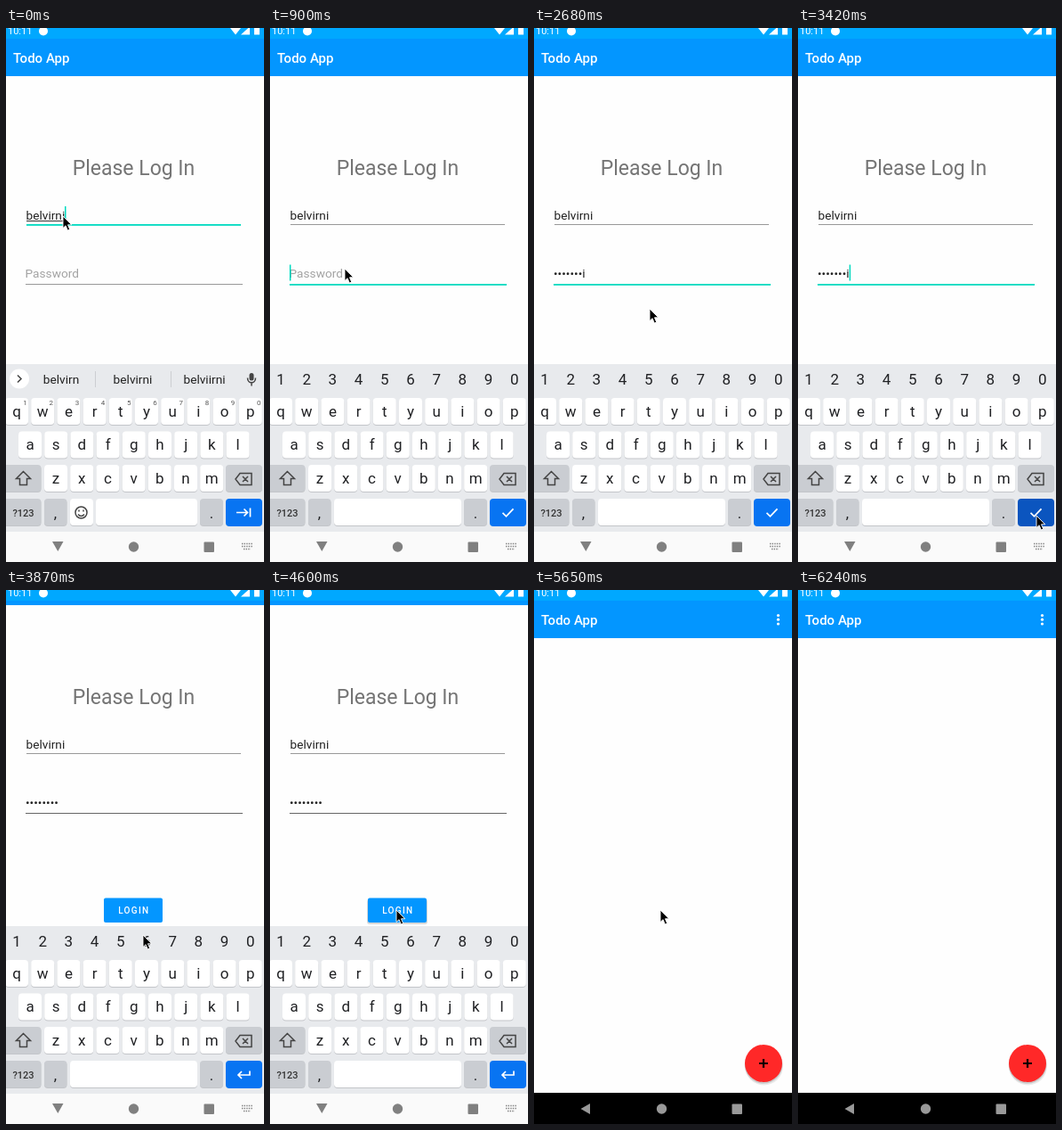
Animation of 290x599 px, one loop 6980 ms. Source, as an HTML page:

```html
<!DOCTYPE html>
<html lang="en">
<head>
<meta charset="utf-8">
<title>Todo App login</title>
<style>
html, body { margin: 0; height: 100%; overflow: hidden; background: #fff; }
svg { display: block; width: 100%; height: 100%; font-family: Roboto, "Open Sans", sans-serif; }
.mid { text-anchor: middle; }
.title { font-size: 15px; font-weight: 500; fill: #fff; }
.field { font-size: 13.7px; fill: #222; }
.key { font-size: 17px; fill: #202124; text-anchor: middle; }
.digit { font-size: 8px; fill: #555; text-anchor: middle; }
.line { fill: none; stroke: #444; stroke-width: 1.5; }
.white { fill: none; stroke: #fff; stroke-width: 1.7; }
</style>
</head>
<body>
<svg viewBox="0 0 290 599">
  <rect width="290" height="599" fill="#fefefe"/>

  <g id="login">
    <rect y="12" width="290" height="42" fill="#0396ff"/>
    <text class="title" x="8" y="39">Todo App</text>
    <text class="mid" x="143.5" y="165" font-size="23" fill="#757575">Please Log In</text>
    <text class="field" id="user" x="22.5" y="214.5"></text>
    <path id="composing" d="M23 216.5H65" stroke="#333"/>
    <rect id="userLine" x="23" y="220" width="241"/>
    <text class="field" id="hint" x="21.5" y="280" style="fill:#a3a3a3">Password</text>
    <text class="field" id="pass" x="22" y="279.7"></text>
    <rect id="passLine" x="22" y="287" width="244"/>
    <rect id="caret" width="1.5" fill="#00dac0"/>
    <rect id="shade" x="109" y="384" width="68" height="28" rx="3" fill="#000" opacity=".15"/>
    <rect x="110" y="382.5" width="66" height="27.5" rx="2" fill="#0396ff"/>
    <text class="mid" x="143.8" y="400" font-size="10" font-weight="500" letter-spacing="1.3" fill="#fff">LOGIN</text>
  </g>

  <g id="keyboard">
    <rect y="377" width="290" height="188" fill="#e8eaed"/>
    <g id="keys"></g>
    <path class="line" d="M19.5 497.5l-8 8h4v7h8v-7h4z"/>
    <path class="line" d="M258 506l5-6.5h13v13h-13zM266 503l6 6m0-6l-6 6"/>
    <text class="mid" x="19.5" y="548" font-size="11" font-weight="500" fill="#333">?123</text>
    <text class="key" x="55.5" y="550">,</text>
    <text class="key" x="231" y="550">.</text>
    <g id="suggest">
      <circle cx="15" cy="393.5" r="11" fill="#fff"/>
      <path class="line" d="M13 389.5l4 4-4 4"/>
      <path d="M100.5 385v18M185.5 385v18" stroke="#ccced2"/>
      <rect x="273.5" y="387" width="5" height="8.5" rx="2.5" fill="#444"/>
      <path class="line" d="M271.5 392.5c0 7 9 7 9 0M276 398v3.5" stroke-width="1.3"/>
    </g>
    <g id="smile">
      <circle class="line" cx="84.5" cy="543.5" r="6.5"/>
      <path class="line" d="M81 545.5q3.5 4 7 0M82 540.5v2M87 540.5v2"/>
    </g>
    <rect id="enter" x="247" y="528" width="41" height="31" rx="4"/>
    <path class="white" id="enterIcon"/>
  </g>

  <g id="home">
    <rect width="290" height="599" fill="#c9c9c9"/>
    <rect x="286" y="537" width="4" height="62"/>
    <rect width="290" height="18" fill="#00a8ff"/>
    <g id="homePage">
      <rect x="-9" y="12" width="299" height="552" fill="#fefefe"/>
      <rect x="-9" y="12" width="299" height="42" fill="#0396ff"/>
      <text class="title" x="8" y="39">Todo App</text>
      <g fill="#fff">
        <circle cx="274.5" cy="28.5" r="1.6"/><circle cx="274.5" cy="33.2" r="1.6"/><circle cx="274.5" cy="38" r="1.6"/>
      </g>
      <circle cx="258.5" cy="534" r="21.5" opacity=".08"/>
      <circle cx="258" cy="532.5" r="21.3" opacity=".14"/>
      <circle cx="258" cy="531" r="21" fill="#ff2828"/>
      <path d="M253 531h10M258 526v10" stroke="#000" stroke-width="2.2"/>
    </g>
  </g>

  <rect width="290" height="12" fill="#00a8ff"/>
  <g fill="#fff">
    <text x="2" y="7.3" font-size="11">10:11</text>
    <circle cx="42" cy="3.5" r="5"/>
    <path d="M252 0h12l-6 7.5zM264 7.5l10-9v9zM279 0h6v7.5h-6z"/>
  </g>

  <rect id="navBack" width="290" height="40"/>
  <g id="nav">
    <path id="back"/>
    <circle cx="143.5" cy="582" r="5.7"/>
    <rect x="222.5" y="576.5" width="11.5" height="11.5" rx="1"/>
    <path id="switcher" d="M265 578.5h12M265 581.5h12M267 584.5h8" fill="none" stroke-width="1.4" stroke-dasharray="1.4 1.2"/>
  </g>

  <path id="mouse" d="M0 0V13.5L3.1 10.7 5.3 16 7.7 15 5.5 9.8H9.8Z" fill="#000" stroke="#fff" stroke-width=".9"/>
</svg>

<script>
const LOOP = 6980, NAME = "belvirni", PITCH = 29.2;
const el = id => document.getElementById(id);
const set = (id, attrs) => { for (const k in attrs) el(id).setAttribute(k, attrs[k]); };
const show = (id, on) => set(id, { display: on ? "inline" : "none" });
const label = (x, y, s, cls) => `<text class="${cls}" x="${x}" y="${y}">${s}</text>`;
const key = (x, y, w, fill = "#fff") =>
  `<rect x="${x}" y="${y + 1}" width="${w}" height="30" rx="4" fill="#c3c5c9"/>` +
  `<rect x="${x}" y="${y}" width="${w}" height="30" rx="4" fill="${fill}"/>`;

function buildKeys() {
  const gray = "#cacdd2";
  let keys = "", digits = "", numbers = "";
  [["qwertyuiop", 12, 415], ["asdfghjkl", 27, 452.5], ["zxcvbnm", 56, 490]].forEach(([row, x0, y]) =>
    [...row].forEach((c, i) => {
      const x = x0 + i * PITCH;
      keys += key(x - 13, y, 26) + label(x, y + 20.5, c, "key");
    }));
  for (let i = 0; i < 10; i++) {
    const x = 12 + i * PITCH, d = (i + 1) % 10;
    digits += label(x + 9.5, 423, d, "digit");
    numbers += label(x, 400, d, "key");
  }
  keys += key(-4, 490, 43.5, gray) + key(247, 490, 41, gray) + key(-4, 528, 43.5, gray) +
    key(43, 528, 25.5, gray) + key(218, 528, 26, gray) +
    `<g id="shortSpace">${key(72, 528, 26)}${key(101, 528, 114)}</g>` +
    `<g id="longSpace">${key(72, 528, 143)}</g><g id="numbers">${numbers}</g>`;
  el("keys").innerHTML = keys;
  const words = [NAME.slice(0, -1), NAME, "belviirni"];
  el("suggest").innerHTML += digits +
    words.map((w, i) => label(62 + i * 80.5, 399, w, "field mid")).join("");
}

// Pointer positions, each held until the next: time, x, y
const path = [
  [0, 64, 211], [150, 65, 215], [300, 69, 229], [450, 76, 250], [600, 82, 266], [750, 84, 270],
  [2680, 130, 315], [2830, 172, 378], [2980, 228, 478], [3130, 264, 546], [3270, 269, 555],
  [3420, 268, 547], [3570, 238, 507], [3720, 166, 409], [3870, 154, 387], [4010, 147, 371],
  [4160, 144, 363], [4310, 142, 359], [5950, 164, 425], [6090, 208, 542]
];
const typed = [[0, 0], [1200, 1], [1340, 2], [1640, 3], [1790, 4], [1930, 5], [2080, 6], [2230, 8]];
const at = (list, t) => list.filter(p => p[0] <= t).pop();
const between = (t, a, b) => t >= a && t < b;

const icons = {
  tab: "M259 543.5h12M267.5 539.5l4 4-4 4M274.5 538.5v10",
  check: "M261.5 543.8l4 4 8-8.5",
  enter: "M274 539.5v4.5h-13M265 540l-4 4 4 4"
};

function underline(id, focused, idle) {
  set(id, { height: focused ? 1.8 : 1, fill: focused ? "#00dac0" : idle });
}

function draw(t) {
  const inPass = t >= 750, numeric = t >= 900, done = t >= 3720, home = t >= 5350, settled = t >= 5650;

  set("login", { transform: `translate(0 ${done ? -37 : 0})` });
  show("composing", !inPass);
  underline("userLine", !inPass, "#999");
  underline("passLine", inPass && !done, done ? "#666" : "#999");

  const n = at(typed, t)[1];
  show("hint", !n);
  el("pass").textContent = done ? "•".repeat(n) : n ? "•".repeat(n - 1) + NAME[n - 1] : "";
  show("caret", !done && !between(t, 300, 750) && !between(t, 2680, 3130));
  set("caret", inPass
    ? { x: 22 + (n ? el("pass").getComputedTextLength() : 0), y: 265.5, height: 18 }
    : { x: 66, y: 200, height: 17 });
  show("shade", t >= 4600);

  for (const id of ["suggest", "smile", "shortSpace"]) show(id, !numeric);
  for (const id of ["numbers", "longSpace"]) show(id, numeric);
  set("enter", { fill: between(t, 3420, 3570) ? "#0b55bf" : "#0874f2" });
  set("enterIcon", { d: icons[done ? "enter" : numeric ? "check" : "tab"] });

  show("home", home);
  set("homePage", { transform: settled ? "" : t < 5500 ? "translate(3.4 5.6) scale(.98)" : "translate(.7 1.2) scale(.996)" });
  set("navBack", { y: !home ? 565 : t < 5500 ? 559 : 564, fill: home ? "#000" : "#fafafa" });
  const ink = !home ? "#808080" : settled ? "#999" : "#484848";
  set("nav", { fill: ink, stroke: "none" });
  set("switcher", { stroke: ink });
  show("switcher", !settled);
  set("back", { d: settled ? "M52.5 582l10.5-6v12z" : "M52 576h12.5l-6.2 11z" });

  const [, x, y] = at(path, t);
  set("mouse", { transform: `translate(${x} ${y})` });
  show("mouse", t < 6240);
}

buildKeys();
el("user").textContent = NAME;
let start;
function tick(now) {
  start ??= now;
  draw((now - start) % LOOP);
  requestAnimationFrame(tick);
}
draw(0);
requestAnimationFrame(tick);
</script>
</body>
</html>
```
